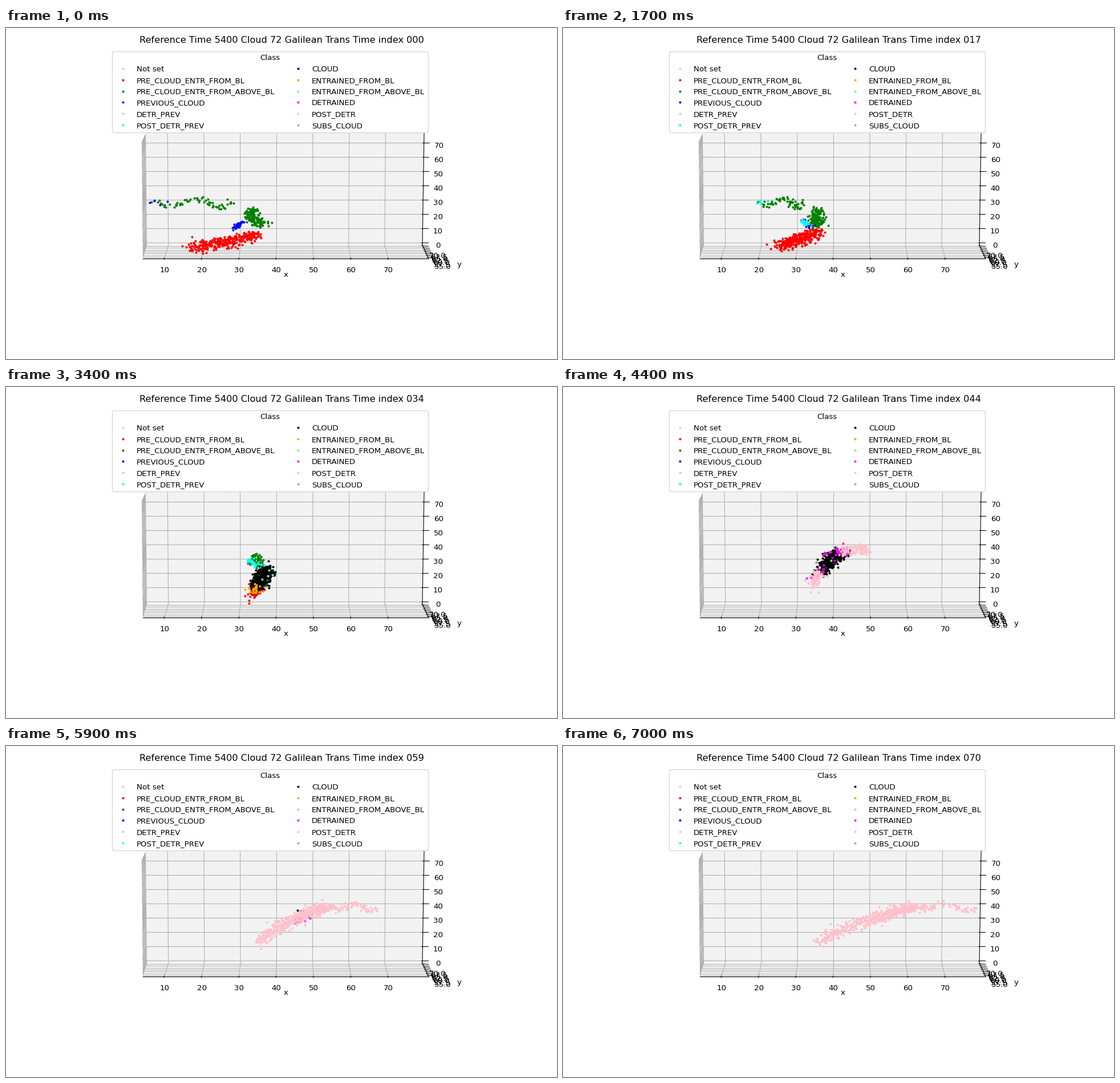
Write a matplotlib script that moves like this. It is 966 px wide and 580 px high and loops after 7100 ms.

```python
import numpy as np
import matplotlib.pyplot as plt
from matplotlib.animation import FuncAnimation

W, H, DPI, FRAMES = 966, 580, 96.6, 71
GATHERED = 34  # time index at which the particles meet in the cloud
plt.rcParams["font.family"] = "DejaVu Sans"
rng = np.random.default_rng(72)

fig = plt.figure(figsize=((W + 0.01) / DPI, (H + 0.01) / DPI), dpi=DPI, facecolor="white")
ax = fig.add_axes([0, 0, 1, 1])
ax.set(xlim=(0, W), ylim=(H, 0))
ax.axis("off")

CLASSES = {
    "Not set": "lightgrey",
    "PRE_CLOUD_ENTR_FROM_BL": "red",
    "PRE_CLOUD_ENTR_FROM_ABOVE_BL": "green",
    "PREVIOUS_CLOUD": "blue",
    "DETR_PREV": "lightblue",
    "POST_DETR_PREV": "cyan",
    "CLOUD": "black",
    "ENTRAINED_FROM_BL": "orange",
    "ENTRAINED_FROM_ABOVE_BL": "lightgreen",
    "DETRAINED": "magenta",
    "POST_DETR": "pink",
    "SUBS_CLOUD": "darkgrey",
}
(UNSET, PRE_BL, PRE_ABOVE, PREV, DETR_PREV, POST_PREV,
 CLOUD, ENTR_BL, ENTR_ABOVE, DETR, POST, SUBS) = range(len(CLASSES))


# ---- static 3D box, projected to pixels ----

def line(p, q, color="#b0b0b0", z=2):
    ax.plot([p[0], q[0]], [p[1], q[1]], color=color, lw=0.8, zorder=z)


def label(x, y, s, size=10):
    return ax.text(x, y, s, size=size, ha="center", va="baseline", zorder=4)


def left_floor(f):
    return 247 - 7 * f, 380 + 24 * f


def left_top(f):
    return 245 - 7 * f, 185 + 15 * f


def right_floor(f):
    return 730 + 11 * f, 380 + 24 * f


RIGHT_TOP = (733, 184.5)


def draw_box():
    panes = [
        ([left_floor(0), left_floor(1), left_top(1), left_top(0)], "#f9f9f9"),
        ([left_floor(0), right_floor(0), RIGHT_TOP, left_top(0)], "#f2f2f2"),
        ([left_floor(0), right_floor(0), right_floor(1), left_floor(1)], "#f5f5f5"),
    ]
    for corners, color in panes:
        ax.add_patch(plt.Polygon(corners, fc=color, ec=color, lw=1, zorder=1))

    for x in range(10, 80, 10):
        back = 474.3 + (x - 40) * 6.32
        front = 473.7 + (x - 40) * 6.54
        top = 474.3 + (x - 40) * 6.37
        line((top, 185), (back, 380))
        line((back, 380), (front, 404))
        line((front, 403), (front - 0.3, 405.5), "black", 3)
        label(front + 0.3, 428, str(x))

    for i in range(7):
        f = 0.08 + 0.84 * i / 6
        left, right = left_floor(f), right_floor(f)
        line(left_top(f), left)
        line(left, right)
        line((right[0] - 2, right[1] - 0.2), (right[0] + 10, right[1] + 0.8), "black", 3)
        label(757 + 1.5 * i, 402.5 + 3.2 * i, f"{70 - 2.5 * i:.1f}")

    for z in range(0, 80, 10):
        y = 375.7 - 2.493 * z
        lean = z / 77
        line((239.9 - 2 * lean, 400 - 2.6 * z), (247 - 2 * lean, y))
        line((247 - 2 * lean, y), (730 + 3 * lean, y))
        line((728 + 2.5 * lean, y), (739.5 + 2.5 * lean, y), "black", 3)
        label(757 + 2.3 * lean, 385 - 2.5 * z, str(z))

    line(left_floor(1), right_floor(1), "black", 3)
    line(right_floor(1), right_floor(0), "black", 3)
    line(right_floor(0), RIGHT_TOP, "black", 3)
    label(491, 436, "x")
    label(795, 418, "y")


draw_box()
title = label(483, 26.3, "", 12)
dots = [ax.plot([], [], "o", ms=2, color=c, label=name, zorder=5 + 0.01 * i)[0]
        for i, (name, c) in enumerate(CLASSES.items())]
legend = ax.legend(handles=dots, title="Class", ncol=2, loc="upper center",
                   bbox_to_anchor=(463, 41), bbox_transform=ax.transData,
                   borderaxespad=0, fontsize=10, title_fontsize=10)
legend.set_zorder(10)


# ---- particles ----

def curve(points, u):
    """Parabola through three points at u = 0, 1/2 and 1."""
    a, b, c = np.array(points, float)[:, :, None]
    return a * (1 - u) * (1 - 2 * u) + b * 4 * u * (1 - u) + c * u * (2 * u - 1)


class Plume:
    """Particles that gather along a curve, lift, and are sheared downwind."""

    def __init__(self, n, start, cloud, end, width, pace=1.2, wave=0):
        self.u, self.q = rng.random((2, n))
        self.start, self.cloud, self.end = (curve(p, self.u) for p in (start, cloud, end))
        self.off = rng.normal(0, 0.5, (2, n))
        self.spin = rng.normal(0, 0.04, n)
        self.width, self.pace = width, pace
        self.ripple = wave * np.sin(10 * self.u)

    def place(self, t):
        if t < GATHERED:
            s = t / GATHERED
            a, b, ease = self.start, self.cloud, (s, s**3)
        else:
            s = (t - GATHERED) / (FRAMES - 1 - GATHERED)
            a, b, ease = self.cloud, self.end, (s**self.pace, 1 - np.exp(-8 * s))
        x, y = (a[i] + (b[i] - a[i]) * ease[i] for i in (0, 1))
        turn = np.exp(1j * self.spin * t) * (self.off[0] + 1j * self.off[1])
        return x + self.width[0] * turn.real, y + self.width[1] * turn.imag + self.ripple


low = Plume(300, start=[(442, 361), (384, 375), (322, 384)],
            cloud=[(459, 318), (443, 338), (432, 364)],
            end=[(615, 283), (530, 306), (441, 346)], width=(13, 10))
high = Plume(150, start=[(433, 317), (433, 334), (456, 343)],
             cloud=[(462, 320), (455, 336), (440, 348)],
             end=[(620, 280), (580, 290), (540, 308)], width=(13, 9))
trail = Plume(66, start=[(254, 303), (338, 306), (394, 308)],
              cloud=[(425, 302), (440, 300), (442, 312)],
              end=[(720, 284), (665, 281), (610, 281)], width=(8, 5), pace=0.8, wave=6)
older = Plume(38, start=[(401, 351), (407, 345), (416, 341)],
              cloud=[(465, 316), (440, 312), (424, 303)],
              end=[(640, 281), (600, 287), (560, 294)], width=(5, 4))


def life(t, enter, leave, before, entrained):
    """Class of each particle from its cloud entry and exit times."""
    leave = np.maximum(leave, enter + 2)
    return np.select([t < enter, t < enter + 1.4, t < leave, t < leave + 2],
                     [before, entrained, CLOUD, DETR], POST)


def low_class(t, u, q):
    leave = 58 - 38 * np.abs(u - 0.35) + 6 * (q - 0.5)
    return life(t, 19 + 17 * u + q, leave, PRE_BL, ENTR_BL)


def high_class(t, u, q):
    enter = 22 + 12 * q + 28 * q**20
    return life(t, enter, 38 + 12 * u + 4 * q, PRE_ABOVE, ENTR_ABOVE)


def trail_class(t, u, q):
    was_cloud = (u < 0.15) & (q < 0.45)
    before = np.where(was_cloud, PREV if t < 3 else POST_PREV, PRE_ABOVE)
    enter = 35 + 2 * q
    return life(t, enter, enter + 3, before, ENTR_ABOVE)


def older_class(t, u, q):
    fade = 5 + 9 * q + 60 * (u - 0.5)**2
    before = np.select([t < fade, t < fade + 2], [PREV, DETR_PREV], POST_PREV)
    return life(t, 35 + 3 * q, 42 + 4 * q, before, ENTR_ABOVE)


PLUMES = [(low, low_class), (high, high_class), (trail, trail_class), (older, older_class)]


def update(t):
    states = [(*p.place(t), classify(t, p.u, p.q)) for p, classify in PLUMES]
    x, y, cls = (np.concatenate(part) for part in zip(*states))
    for i, dot in enumerate(dots):
        dot.set_data(x[cls == i], y[cls == i])
    title.set_text(f"Reference Time 5400 Cloud 72 Galilean Trans Time index {t:03d}")
    return [*dots, title]


anim = FuncAnimation(fig, update, frames=FRAMES, interval=100, repeat=True, repeat_delay=0)
plt.show()
```
